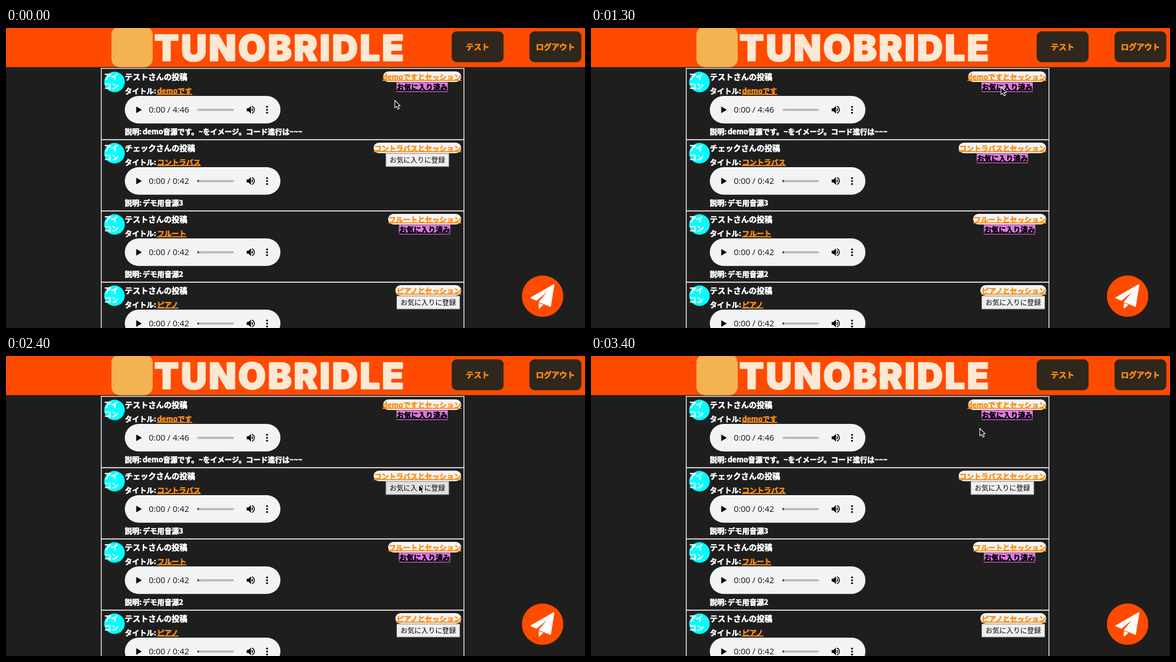
An HTML page without scripts that plays this animation: 1038 by 539 pixels, repeating every 3.5 s.

```html
<!DOCTYPE html>
<html lang="ja">
<head>
<meta charset="utf-8">
<title>投稿一覧</title>
<style>
html, body { margin: 0; width: 100%; height: 100%; overflow: hidden; background: #1e1e1f; }
svg { display: block; width: 1038px; height: 539px; }
text {
  font: 900 13px "Noto Sans CJK JP", "Noto Sans CJK", sans-serif;
  color: #fff; fill: currentColor; stroke: currentColor; stroke-width: .65px;
}
.head { font-size: 14px; }
.mid { text-anchor: middle; }
.brand { font: 900 64px Inter, sans-serif; letter-spacing: 3.6px; color: #fce8d3; stroke-width: 2.2px; stroke-linejoin: bevel; }
.nav { font-size: 14px; color: #ff8c14; }
.link { color: #ff8c14; text-decoration: underline; }
.end { text-anchor: end; }
.faved { color: #000; text-decoration: underline; }
.label { font-weight: 400; font-size: 12.45px; color: #000; stroke: none; }
.time { font: 400 14.9px "Open Sans", "Noto Sans", sans-serif; color: #111; stroke: none; }
.pill { fill: #f5f5f5; }
.violet { fill: #de78e2; }
.btn { fill: #efefef; stroke: #858585; }

/* One 3.5 s loop: register, wander up, return, undo, rest */
.move, .on, .off, .hover, .hand, .arrow { animation: 3.5s step-end infinite; }
.move { animation-name: move; animation-timing-function: ease-in-out; }
.on { animation-name: on; }
.off { animation-name: off; }
.hover { animation-name: hover; }
.hand { animation-name: hand; }
.arrow { animation-name: arrow; }
@keyframes move {
  0%, 2.86% { transform: translate(697px, 130px); }
  8.57%, 15.5% { transform: translate(740px, 231px); }
  21.4%, 37.2% { transform: translate(735px, 106px); }
  48.5%, 69% { transform: translate(740px, 231px); }
  82.8%, 100% { transform: translate(697px, 130px); }
}
@keyframes on { 0%, 60%, 100% { opacity: 0; } 14.2% { opacity: 1; } }
@keyframes off { 0%, 60%, 100% { opacity: 1; } 14.2% { opacity: 0; } }
@keyframes hover { 0%, 14.2%, 71%, 100% { fill: #efefef; } 8.5%, 60% { fill: #e0e0e0; } }
@keyframes hand { 0%, 60%, 100% { opacity: 0; } 48.5% { opacity: 1; } }
@keyframes arrow { 0%, 60%, 100% { opacity: 1; } 48.5% { opacity: 0; } }
</style>
</head>
<body>
<svg viewBox="0 0 1038 539">
  <defs>
    <g id="post">
      <rect x="170.7" y="72.6" width="650.3" height="128" fill="none" stroke="#fff" stroke-width="1.4"/>
      <circle cx="194.5" cy="97" r="18.5" fill="#0ff"/>
      <text x="176" y="92">アイ</text>
      <text x="176" y="109">コン</text>
      <text x="213" y="117.5">タイトル:</text>
      <rect x="213" y="122" width="279" height="49.5" rx="24.75" fill="#f1f3f4"/>
      <path d="M233.5 141V153L243.5 147Z"/>
      <rect x="343" y="145" width="66" height="4" rx="2" fill="#bbbcbd"/>
      <path d="M431.5 144.3h3.3l4.2-4.2v13.6l-4.2-4.2h-3.3Z"/>
      <path d="M440.5 143.5a3.8 3.8 0 0 1 0 6.8Z"/>
      <path d="M440.7 140.8a6.4 6.4 0 0 1 0 12.2" fill="none" stroke="#000" stroke-width="1.6"/>
      <circle cx="468" cy="141.8" r="1.7"/>
      <circle cx="468" cy="147" r="1.7"/>
      <circle cx="468" cy="152.2" r="1.7"/>
    </g>
    <g id="played">
      <rect x="343" y="145" width="3" height="4" rx="1" fill="#555"/>
      <text class="time" x="256" y="152">0:00 / 0:42</text>
    </g>
    <g id="faved">
      <rect class="violet" x="-46" y="97.5" width="92" height="17.5"/>
      <text class="faved mid" y="111">お気に入り済み</text>
    </g>
  </defs>

  <rect width="1038" height="539" fill="#1e1e1f"/>

  <rect width="1038" height="70.3" fill="#ff4b00"/>
  <rect x="189" y="-3" width="74" height="73.5" rx="15" fill="#f3b350"/>
  <text class="brand mid" x="491.5" y="58.5">TUNOBRIDLE</text>
  <g fill="#30271c">
    <rect x="799" y="6" width="93" height="55.5" rx="9"/>
    <rect x="938.5" y="6" width="93" height="55.5" rx="9"/>
  </g>
  <text class="nav mid" x="845.5" y="38.5">テスト</text>
  <text class="nav mid" x="985" y="38.5">ログアウト</text>

  <g>
    <use href="#post"/>
    <text class="head" x="213" y="93">テストさんの投稿</text>
    <text class="link" x="271" y="117.5">demoです</text>
    <text class="time" x="256" y="152">0:00 / 4:46</text>
    <text x="213" y="190.5">説明:<tspan x="245">demo音源です。~をイメージ。コード進行は~~~</tspan></text>
    <rect class="pill" x="676" y="78" width="140" height="19" rx="9.5"/>
    <text class="link end" x="816" y="92.5">demoですとセッション</text>
    <use href="#faved" x="746"/>
  </g>

  <g transform="translate(0 128)">
    <use href="#post"/>
    <use href="#played"/>
    <text class="head" x="213" y="93">チェックさんの投稿</text>
    <text class="link" x="271" y="117.5">コントラバス</text>
    <text x="213" y="190.5">説明:<tspan x="245">デモ用音源3</tspan></text>
    <rect class="pill" x="659" y="78" width="157" height="19" rx="9.5"/>
    <text class="link end" x="816" y="92.5">コントラバスとセッション</text>
    <g class="on"><use href="#faved" x="737.5"/></g>
    <g class="off">
      <rect class="btn hover" x="681" y="97.5" width="113" height="23.5"/>
      <text class="label mid" x="737.5" y="114">お気に入りに登録</text>
    </g>
  </g>

  <g transform="translate(0 256)">
    <use href="#post"/>
    <use href="#played"/>
    <text class="head" x="213" y="93">テストさんの投稿</text>
    <text class="link" x="271" y="117.5">フルート</text>
    <text x="213" y="190.5">説明:<tspan x="245">デモ用音源2</tspan></text>
    <rect class="pill" x="685" y="78" width="131" height="19" rx="9.5"/>
    <text class="link end" x="816" y="92.5">フルートとセッション</text>
    <use href="#faved" x="750.5"/>
  </g>

  <g transform="translate(0 384)">
    <use href="#post"/>
    <use href="#played"/>
    <text class="head" x="213" y="93">テストさんの投稿</text>
    <text class="link" x="271" y="117.5">ピアノ</text>
    <rect class="pill" x="698" y="78" width="118" height="19" rx="9.5"/>
    <text class="link end" x="816" y="92.5">ピアノとセッション</text>
    <rect class="btn" x="700.5" y="97.5" width="113" height="23.5"/>
    <text class="label mid" x="757" y="114">お気に入りに登録</text>
  </g>

  <circle cx="962" cy="481.8" r="37.2" fill="#ff4b00"/>
  <g fill="#fff" stroke="#fff" stroke-width="1.6" stroke-linejoin="round">
    <path d="M982.3 461L941 484.8L951 489.2L975.5 468.5L956 492.3L976 500Z"/>
    <path d="M956 495.3V503L962 497.6Z"/>
  </g>

  <g class="move">
    <path class="arrow" d="M0 0V13.6L3.2 10.8L5.4 15.8L8 14.7L5.8 9.8H9.8Z" fill="#111" stroke="#fff" stroke-width="1.1" stroke-linejoin="round"/>
    <path class="hand" d="M-1.8 1.4a1.4 1.4 0 0 1 2.8 0V5q1.2-.9 2.4.2q1.2-.7 2.2.5q2-.5 2 1.6q.1 3.8-2 6.7H-.4Q-2 11-4.6 8.4q.4-1.9 2.8-.2Z" fill="#fff" stroke="#111" stroke-width=".9" stroke-linejoin="round"/>
  </g>
</svg>
</body>
</html>
```
